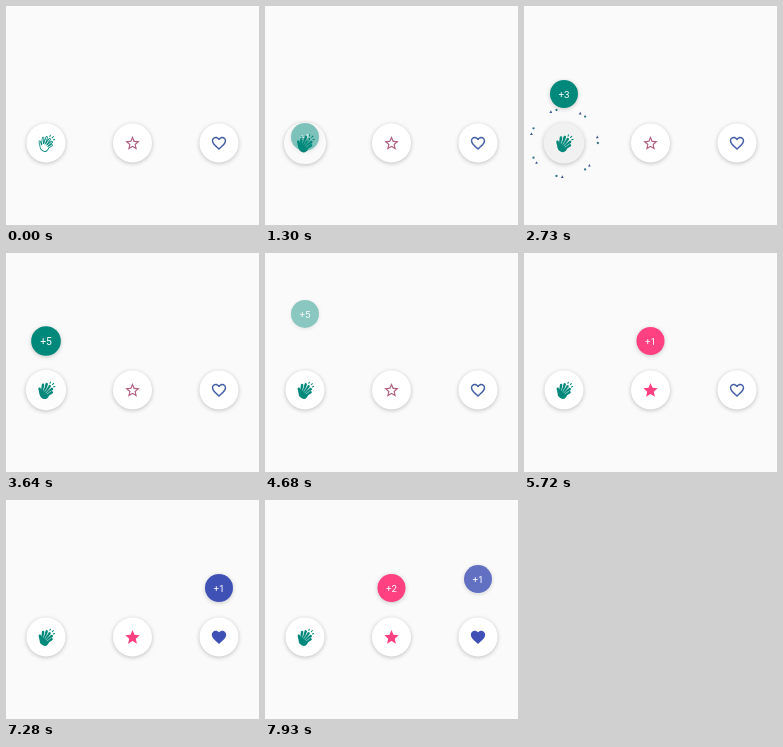
Animation, 253 px wide and 219 px high, one loop 8000 ms. Source, as an HTML page:

```html
<!DOCTYPE html>
<html lang="en">
<head>
<meta charset="utf-8">
<title>Reaction buttons</title>
<style>
  html, body { margin: 0; width: 100%; height: 100%; overflow: hidden; background: #fafafa; }
  svg { display: block; width: 253px; height: 219px; }
  .disc { filter: drop-shadow(0 1.5px 2px rgba(0, 0, 0, .24)); }
  .badge { filter: drop-shadow(0 1.5px 2px rgba(0, 0, 0, .2)); }
  text { font: 9.8px Roboto, sans-serif; fill: #fff; text-anchor: middle; }
  .hand path { fill: none; stroke-linecap: round; stroke-linejoin: round; }
</style>
</head>
<body>
<svg id="stage" viewBox="0 0 253 219"></svg>
<script>
const LOOP = 8000, STEP = 130, BASE = 137, LIFT = 49;
const TEAL = '#00897b', PINK = '#ff4081', BLUE = '#3f51b5';

const STAR = {
  outer: 'M12 17.27L18.18 21l-1.64-7.03L22 9.24l-7.19-.61L12 2 9.19 8.63 2 9.24l5.46 4.73L5.82 21z',
  inner: 'M12 15.4l-3.76 2.27 1-4.28-3.32-2.88 4.38-.38L12 6.1l1.71 4.04 4.38.38-3.32 2.88 1 4.28z'
};
const HEART = {
  outer: 'M12 21.35l-1.45-1.32C5.4 15.36 2 12.28 2 8.5 2 5.42 4.42 3 7.5 3c1.74 0 3.41.81 4.5 2.09C13.09 3.81 14.76 3 16.5 3 19.58 3 22 5.42 22 8.5c0 3.78-3.4 6.86-8.55 11.54z',
  inner: 'M12.1 18.55l-.1.1-.1-.1C7.14 14.24 4 11.39 4 8.5 4 6.5 5.5 5 7.5 5c1.54 0 3.04.99 3.57 2.36h1.87C13.46 5.99 14.96 5 16.5 5c2 0 3.5 1.5 3.5 3.5 0 2.89-3.14 5.74-7.9 10.05z'
};
// Fingers share one stroke width; the palm is a short, very thick stroke.
const FINGERS = 'M5 17L3.4 10M7 13L8 4.6M9 16L13 3.8M10 17L17 6.5M11 18L20 10.3M12 19.5L19.8 14.8';
const PALM = 'M9.3 17.5l1 .6';
const GAPS = 'M8.4 12L10.2 6.5M10.5 13.5L14.6 6.8M12 15.5L17.6 9.2M13.5 17L19 13';
const SPARKS = 'M17.4 2.6l.6-1.6M20.6 4.4l1.6-1.6M22.2 7.4l1.8-.5';

// Each visit is the time a badge appears and the time it flies off.
const buttons = [
  { x: 40, color: TEAL, taps: [1250, 1850, 2480, 2950, 3620], visits: [[1250, 4520]] },
  { x: 126.5, color: PINK, line: '#b05f80', icon: STAR, taps: [5150, 7350],
    visits: [[5150, 6494], [7350, LOOP]] },
  { x: 213, color: BLUE, line: '#4460a4', icon: HEART, taps: [6450], visits: [[6450, 7877]] }
];

const clamp = v => Math.max(0, Math.min(1, v));
const bump = p => Math.sin(Math.PI * clamp(p));

function add(parent, tag, attrs = {}) {
  const el = document.createElementNS('http://www.w3.org/2000/svg', tag);
  return parent.appendChild(set(el, attrs));
}
function set(el, attrs) {
  for (const key in attrs) el.setAttribute(key, attrs[key]);
  return el;
}

function drawHand(parent, filled) {
  const g = add(parent, 'g', { class: 'hand' });
  const line = (d, stroke, width) => add(g, 'path', { d, stroke, 'stroke-width': width });
  line(FINGERS, TEAL, 3.4);
  line(PALM, TEAL, 11.4);
  if (!filled) {
    line(FINGERS, '#fff', 1.2);
    line(PALM, '#fff', 9.2);
  }
  line(GAPS, filled ? '#fff' : TEAL, .7);
  line(SPARKS, TEAL, 1.4);
  return g;
}

function drawIcon(b, parent, filled) {
  if (!b.icon) return drawHand(parent, filled);
  const { outer, inner } = b.icon;
  return add(parent, 'path', {
    d: filled ? outer : outer + inner,
    fill: filled ? b.color : b.line, 'fill-rule': 'evenodd'
  });
}

function build(b) {
  const stage = document.getElementById('stage');
  b.body = add(stage, 'g');
  b.disc = add(b.body, 'circle', { r: 19.5, class: 'disc' });
  const icon = add(b.body, 'g', { transform: 'scale(.72) translate(-12 -11.7)' });
  b.empty = drawIcon(b, icon, false);
  b.full = drawIcon(b, icon, true);

  b.burst = add(stage, 'g', { transform: `translate(${b.x} ${BASE})` });
  b.bits = [];
  for (let i = 0; i < 14; i++) {
    const dot = i % 2;
    const el = dot
      ? add(b.burst, 'circle', { r: 1.15, fill: '#33758a' })
      : add(b.burst, 'path', { d: 'M0-1.5L1.4 1.1H-1.4z', fill: '#3f5a96' });
    const deg = -5 + (i >> 1) * 360 / 7 + (dot ? 5 : -5);
    b.bits.push({ el, angle: deg * Math.PI / 180 });
  }

  b.badge = add(stage, 'g');
  add(b.badge, 'circle', { r: 14, fill: b.color, class: 'badge' });
  b.label = add(b.badge, 'text', { y: 3.9 });
}

function update(b, t) {
  const done = b.taps.filter(s => s <= t);
  const age = done.length ? t - done[done.length - 1] : Infinity;

  set(b.body, { transform: `translate(${b.x} ${BASE}) scale(${1 + .15 * bump(age / 280)})` });
  const shade = Math.round(255 - 15 * bump(age / 420));
  set(b.disc, { fill: `rgb(${shade},${shade},${shade})` });
  b.empty.style.display = done.length ? 'none' : '';
  b.full.style.display = done.length ? '' : 'none';

  const p = (age - 190) / 270;
  b.burst.style.display = p > 0 && p < 1 ? '' : 'none';
  if (p > 0 && p < 1) {
    const r = 29.5 + 11 * (1 - (1 - p) ** 2);
    const size = Math.min(1, 2.4 * (1 - p));
    for (const { el, angle } of b.bits) {
      set(el, { transform: `translate(${r * Math.cos(angle)} ${r * Math.sin(angle)}) scale(${size})` });
    }
  }

  const visit = b.visits.filter(v => v[0] <= t).pop();
  b.badge.style.display = visit ? '' : 'none';
  if (!visit) return;
  const rise = clamp((t - visit[0]) / 400);
  const exit = clamp((t - visit[1]) / 290);
  const pulse = done[done.length - 1] > visit[0] ? bump(age / 200) : 0;
  set(b.badge, {
    transform: `translate(${b.x} ${BASE - LIFT * (rise + exit)}) scale(${1 + .2 * pulse})`,
    opacity: Math.min(1, rise / .25) * (1 - exit)
  });
  b.label.textContent = '+' + done.length;
}

function frame() {
  const now = performance.now() % LOOP;
  const t = Math.floor(now / STEP) * STEP;
  buttons.forEach(b => update(b, t));
  requestAnimationFrame(frame);
}

buttons.forEach(build);
frame();
</script>
</body>
</html>
```
